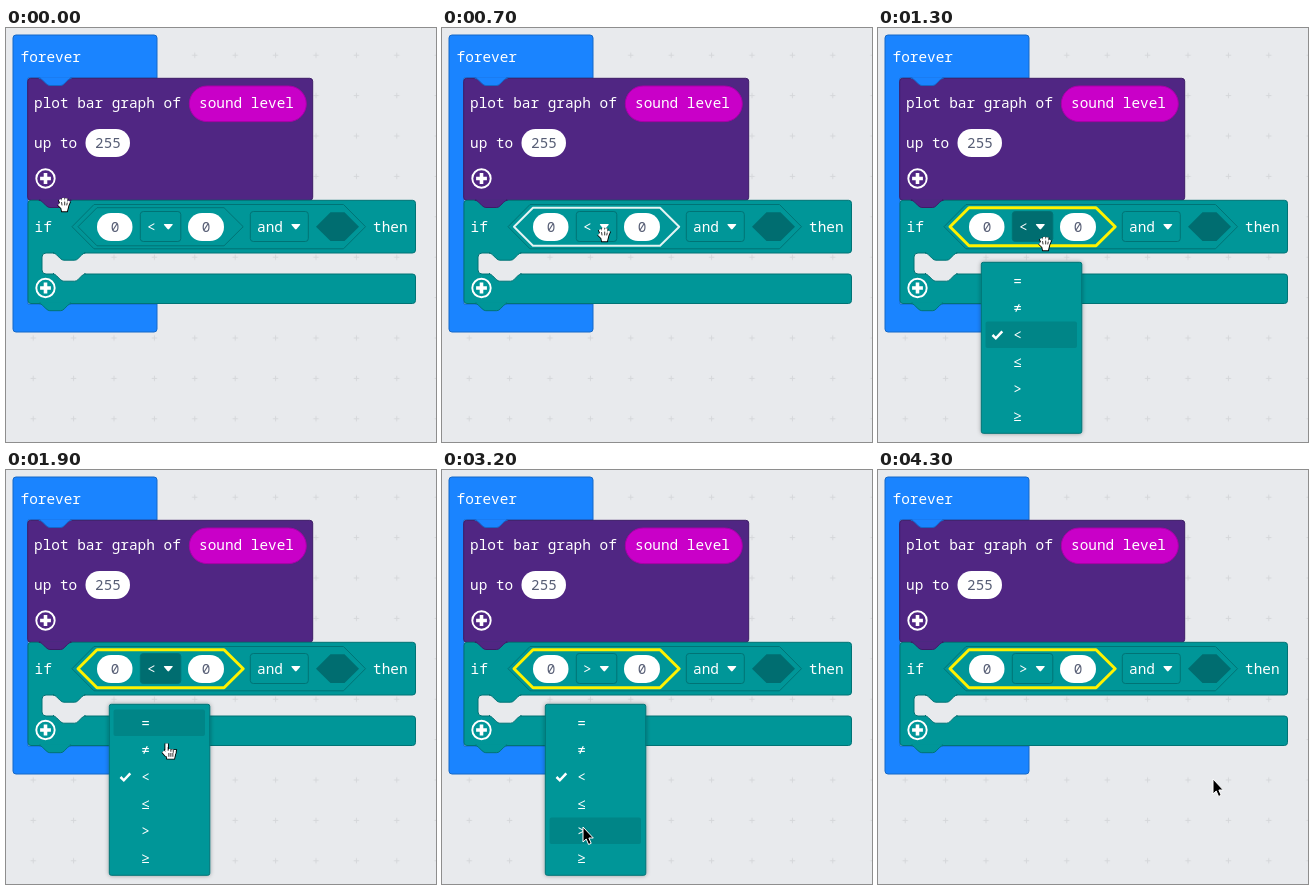
An HTML page for the animation above (4.4 s loop, 430 px wide and 414 px high).

```html
<!DOCTYPE html>
<html lang="en">
<head>
<meta charset="utf-8">
<title>Block editor</title>
<style>
  html, body { margin: 0; width: 100%; height: 100%; overflow: hidden; background: #e8eaed; }
  svg { display: block; width: 100%; height: 100%; }
  text { font: 500 14.4px "Noto Sans Mono", "DejaVu Sans Mono", monospace; fill: #fff; }
  .number { fill: #575e75; }
  .middle, .number { text-anchor: middle; }
  .blue { fill: #1a84ff; stroke: #1468c8; }
  .purple { fill: #502683; stroke: #3d1c66; }
  .teal { fill: #009698; stroke: #007375; }
  .ground { fill: #e8eaed; stroke: #007375; }
  .pill { fill: #fff; }
  .outline { fill: none; stroke-linejoin: round; }
  .hand path { stroke-linecap: round; stroke-linejoin: round; }
  .edge { fill: #000; stroke: #000; stroke-width: 4.4; }
  .skin { fill: #fff; stroke: #fff; stroke-width: 2.6; }
  .crease { stroke: #000; stroke-width: .8; }
</style>
</head>
<body>
<svg viewBox="0 0 430 414">
  <defs>
    <pattern id="grid" x="7" y="7" width="40.4" height="40.4" patternUnits="userSpaceOnUse">
      <path d="M17.5 20.2h5.4M20.2 17.5v5.4" stroke="#d5d7da"/>
    </pattern>
    <path id="bump" d="M1-1L0 0q2 0 3.6 1.8l3.6 3.6q2 1.8 3.6 1.8h10.8q2 0 3.6-1.8l3.6-3.6q2-1.8 3.6-1.8l-1-1"/>
    <path id="compare" d="M72 198.7L91 179.7H218L237.2 198.7L218 217.8H91Z"/>
    <path id="arrow" d="M1 0h7.6q1.2 0 .4 1L5.6 5q-.8.9-1.6 0L.6 1Q-.2 0 1 0z" fill="#fff"/>
    <g id="plus" fill="none" stroke="#fff">
      <circle r="9.2" stroke-width="1.9"/>
      <path d="M-5.4 0H5.4M0-5.4V5.4" stroke-width="3.6"/>
    </g>
    <path id="open-hand" d="M-1 4L-5.2 0M-1 3L-4-4.5M0 3L-1-6M1 3L2.3-5.6M2 4L5-3M-2 2H3L2 6H-1Z"/>
    <path id="pointing-hand" d="M0 1V9M3 6.5V10M5.5 7V10M7.8 8V11M-3.5 9L0 13M0 9H7.8L6.5 15H1.5Z"/>
    <filter id="shadow" x="-10%" y="-10%" width="120%" height="120%">
      <feDropShadow dx="0" dy="0" stdDeviation="2" flood-opacity=".35"/>
    </filter>
  </defs>

  <rect width="430" height="414" fill="#e8eaed"/>
  <rect width="430" height="414" fill="url(#grid)"/>

  <path class="blue" d="M10 7H148a3 3 0 0 1 3 3V50H22V276H151V301a3 3 0 0 1-3 3H10a3 3 0 0 1-3-3V10a3 3 0 0 1 3-3z"/>
  <text x="14.5" y="34">forever</text>

  <rect class="purple" x="21.7" y="50.3" width="285" height="122" rx="3"/>
  <use href="#bump" class="blue" x="33" y="50.3"/>
  <text x="28" y="80">plot bar graph of</text>
  <rect x="183.3" y="58" width="117" height="35.6" rx="17.8" fill="#c900c8" stroke="#a900a8"/>
  <text x="193" y="80">sound level</text>
  <text x="28" y="120">up to</text>
  <rect class="pill" x="79.5" y="101" width="44.5" height="28" rx="14"/>
  <text class="number" x="102" y="120">255</text>
  <use href="#plus" x="39.5" y="150.5"/>

  <path class="teal" d="M25 172.3H406.5a3 3 0 0 1 3 3V222a3 3 0 0 1-3 3H40a4 4 0 0 0-4 4V242a4 4 0 0 0 4 4H406.5a3 3 0 0 1 3 3V272.5a3 3 0 0 1-3 3H25a3 3 0 0 1-3-3V175.3a3 3 0 0 1 3-3z"/>
  <use href="#bump" class="purple" x="33" y="172.3"/>
  <use href="#bump" class="teal" x="47" y="225"/>
  <use href="#bump" class="ground" x="47" y="246"/>
  <use href="#bump" class="teal" x="33" y="275.5"/>
  <text x="28.5" y="204">if</text>
  <text x="367" y="204">then</text>
  <use href="#plus" x="39.5" y="260"/>

  <path class="teal" d="M66 198.7L88 176.5H337.5L359.5 198.7L337.5 220.8H88Z"/>
  <use href="#compare" class="teal"/>
  <rect class="pill" x="91" y="185" width="35.5" height="28" rx="14"/>
  <text class="number" x="109" y="204">0</text>
  <rect id="field" class="teal" x="134.3" y="183.5" width="40.5" height="30" rx="3"/>
  <text id="operator" x="141" y="204">&lt;</text>
  <use href="#arrow" x="157.5" y="196"/>
  <rect class="pill" x="182" y="185" width="36" height="28" rx="14"/>
  <text class="number" x="200" y="204">0</text>
  <rect class="teal" x="244.3" y="183.5" width="58" height="30" rx="3"/>
  <text x="251" y="204">and</text>
  <use href="#arrow" x="285" y="196"/>
  <path d="M310 198.7L324.5 184.3H338.5L353 198.7L338.5 213H324.5Z" fill="#006d70"/>
  <use id="outline" href="#compare" class="outline"/>

  <g id="menu">
    <rect class="teal" x="103.3" y="234.3" width="100.5" height="171" rx="2" filter="url(#shadow)"/>
    <rect id="highlight" x="107.5" width="91.5" height="26.5" rx="2" fill="#008587"/>
    <path d="M114.5 307l3.3 3.3 6.5-7" fill="none" stroke="#fff" stroke-width="2.5"/>
  </g>

  <g id="cursor">
    <g class="kind hand">
      <use href="#open-hand" class="edge"/>
      <use href="#open-hand" class="skin"/>
      <path class="crease" d="M-2.4-1.5L-2 1M.7-2V1M3.2-1L2.8 1"/>
    </g>
    <g class="kind hand">
      <use href="#pointing-hand" class="edge"/>
      <use href="#pointing-hand" class="skin"/>
      <path class="crease" d="M1.5 5V8M4.2 7V9M6.6 8V10M2.2 11V14M4.2 11V14M6.2 11V14"/>
    </g>
    <path class="kind" stroke="#fff" d="M0-1V14L3.2 11L5.6 16.5L8.2 15.3L5.9 10H10.3Z"/>
  </g>
</svg>
<script>
  const LOOP = 4400, STEP = 100, OPEN = 1000, CLOSE = 3200, FADE = 200;
  const MENU_TOP = 239, ROW = 27, SIGNS = "=≠<≤>≥";
  const byId = id => document.getElementById(id);
  const [field, operator, outline, menu, highlight, cursor] =
    ["field", "operator", "outline", "menu", "highlight", "cursor"].map(byId);
  const kinds = document.querySelectorAll(".kind");

  const START = { x: 58, y: 176 };
  const MOVES = [
    { from: 0, to: 700, x: 162, y: 206 },
    { from: 700, to: 1300, x: 167, y: 215 },
    { from: 1700, to: 2200, x: 149, y: 378 },
    { from: 2200, to: 2500, x: 142, y: 334 },
    { from: 2500, to: 2800, x: 141, y: 358 },
    { from: CLOSE, to: 3700, x: 234, y: 350 },
    { from: 3700, to: 4200, x: 335, y: 310 }
  ];

  const clamp = v => Math.min(1, Math.max(0, v));
  const smooth = k => k * k * (3 - 2 * k);
  const rowTop = row => MENU_TOP + ROW * row;

  [...SIGNS].forEach((sign, row) => {
    const label = document.createElementNS("http://www.w3.org/2000/svg", "text");
    label.setAttribute("class", "middle");
    label.setAttribute("x", 139.5);
    label.setAttribute("y", rowTop(row) + 18.5);
    label.textContent = sign;
    menu.append(label);
  });

  // Each eased move starts where the previous one ended.
  const position = t => MOVES.reduce((at, move) => {
    const k = smooth(clamp((t - move.from) / (move.to - move.from)));
    return { x: at.x + (move.x - at.x) * k, y: at.y + (move.y - at.y) * k };
  }, START);

  // The highlight trails the pointer; above the menu it rests on the checked sign.
  function hoveredRow(t) {
    const row = Math.floor((position(t - STEP / 2).y - MENU_TOP) / ROW);
    return row < 0 ? SIGNS.indexOf("<") : row;
  }

  function draw() {
    const t = Math.floor(performance.now() % LOOP / STEP) * STEP;
    const { x, y } = position(t);
    const selected = t >= OPEN, closed = t >= CLOSE;

    cursor.setAttribute("transform", `translate(${x} ${y})`);
    const kind = closed ? 2 : y > MENU_TOP ? 1 : 0;
    kinds.forEach((shape, i) => shape.style.display = i === kind ? "" : "none");

    outline.style.stroke = selected ? "#fff200" : x > 80 ? "#e4f4f4" : "none";
    outline.style.strokeWidth = selected ? 3 : 2;
    field.style.fill = selected && !closed ? "#006d70" : "";
    operator.textContent = closed ? ">" : "<";

    menu.style.opacity = clamp((t - OPEN) / FADE) * clamp(1 - (t - CLOSE) / FADE);
    highlight.setAttribute("y", rowTop(hoveredRow(t)) + .5);
    requestAnimationFrame(draw);
  }
  draw();
</script>
</body>
</html>
```
